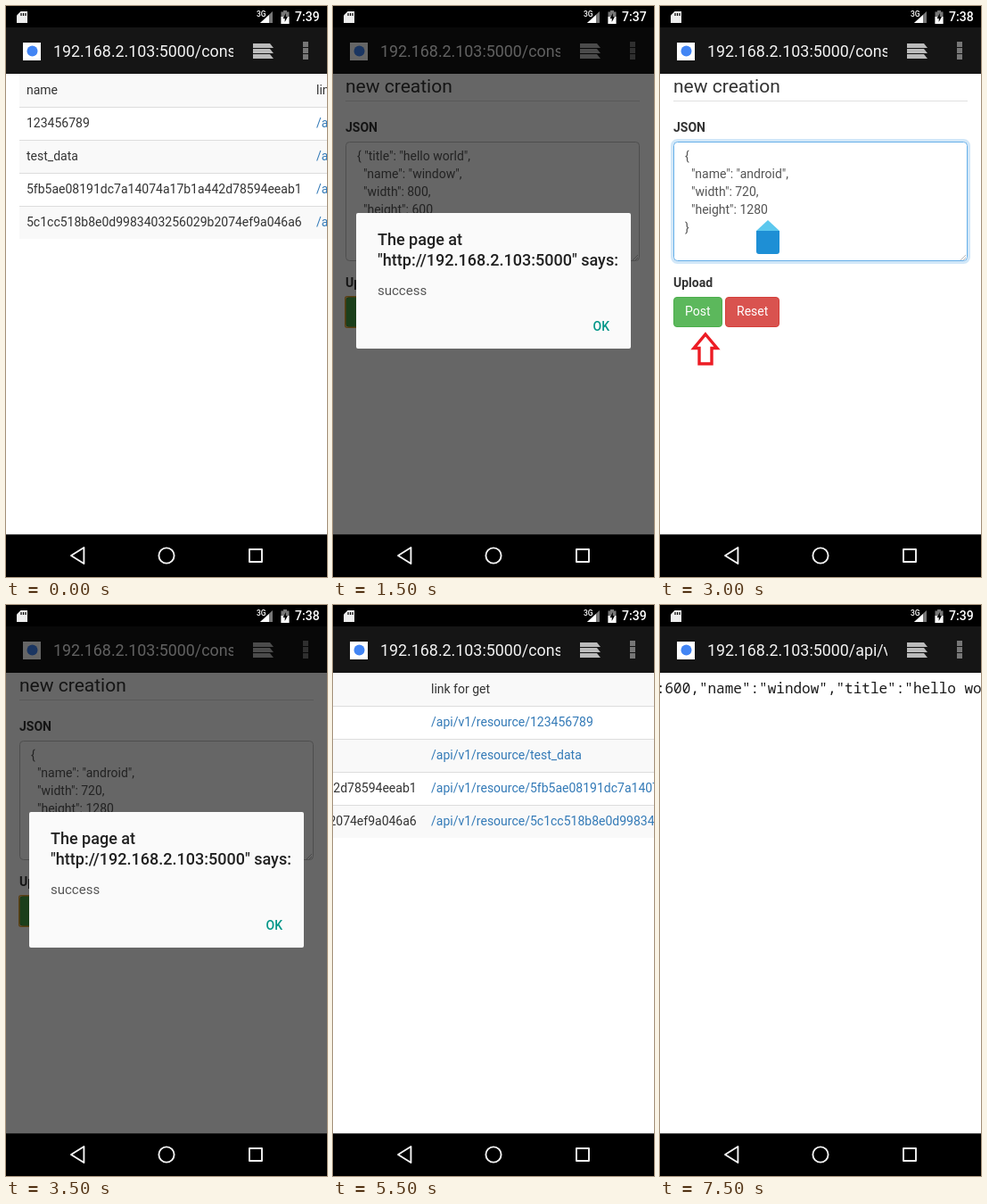
Write an HTML page that moves like this. It is 360 by 640 pixels and loops after 8000 ms.

```html
<!DOCTYPE html>
<html lang="en">
<head>
<meta charset="utf-8">
<title>REST console on a phone</title>
<style>
  html, body { margin: 0; width: 100%; height: 100%; overflow: hidden; background: #000; }
  svg { display: block; width: 360px; height: 640px; }
  text { font-family: Roboto, "Noto Sans", sans-serif; white-space: pre; }
</style>
</head>
<body>
<svg viewBox="0 0 360 640">
  <defs><clipPath id="urlClip"><rect x="50" y="24" width="205" height="52"/></clipPath></defs>
  <rect width="360" height="640" fill="#fff"/>
  <g id="page"></g>
  <g id="bars"></g>
  <g id="overlay"></g>
  <g id="system"></g>
</svg>
<script>
const STEP = 500;
const INK = '#333', LINK = '#337ab7', RED = '#ed1c24';
const HOST = '192.168.2.103:5000';
const HASHES = [
  '5fb5ae08191dc7a14074a17b1a442d78594eeab1',
  '5c1cc518b8e0d9983403256029b2074ef9a046a6'
];
const POST_BODY = ['{ "title": "hello world",', '  "name": "window",', '  "width": 800,', '  "height": 600', '}'];
const PUT_BODY = ['{', '  "name": "android",', '  "width": 720,', '  "height": 1280', '}'];
const RESULT = '{"height":600,"name":"window","title":"hello world","width":800}';

const escape = s => s.replace(/&/g, '&amp;').replace(/</g, '&lt;');
const text = (x, y, s, size = 14, fill = INK, extra = '') =>
  `<text x="${x}" y="${y}" font-size="${size}" fill="${fill}" ${extra}>${escape(s)}</text>`;
const rect = (x, y, w, h, fill, extra = '') =>
  `<rect x="${x}" y="${y}" width="${w}" height="${h}" fill="${fill}" ${extra}/>`;
const path = (d, fill, extra = '') => `<path d="${d}" fill="${fill}" ${extra}/>`;
const bold = 'font-weight="700"', medium = 'font-weight="500"', middle = 'text-anchor="middle"';

// Outlined arrow pointing up, with its tip at (x, y).
function arrow(x, y, head, stem, neck, length, turn = 0) {
  const d = `M0 0L${head} ${neck}H${stem}V${length}H${-stem}V${neck}H${-head}Z`;
  return path(d, '#fff', `stroke="${RED}" stroke-width="3.4" transform="translate(${x} ${y}) rotate(${turn})"`);
}

function home(x, arrowX, arrowY) {
  const heading = (y, s) => text(x, y, s, 24);
  const link = (y, s) =>
    `<text x="${x}" y="${y}" font-size="14" fill="${INK}"><tspan fill="${LINK}">${s}</tspan> ...</text>`;
  const verbs = ['GET', 'PUT', 'POST', 'DELETE'];
  return heading(125, 'Help') + verbs.map((v, i) => link(154 + i * 30, 'usage for ' + v)).join('')
    + heading(291, 'Operation Console') + verbs.map((v, i) => link(320 + i * 30, 'op console for ' + v)).join('')
    + heading(457, 'Log')
    + ['timestamp of request...', 'received data...', 'visualization of structure content...']
      .map((s, i) => text(x, 486 + i * 30, '(v) ' + s)).join('')
    + text(x, 576, 'click here to download', 14, LINK)
    + arrow(arrowX, arrowY, 15.5, 8, 22, 46, -90);
}

function button(x, w, label, fill, border) {
  return rect(x + .5, 326.5, w - 1, 33, fill, `rx="3.5" stroke="${border}"`) + text(x + 13, 347, label, 14, '#fff');
}

function form(x, lines, { editing = false, pressed = false, pointer = '' } = {}) {
  const glow = editing
    ? rect(x - 1.5, 150.5, 333, 137, 'none', 'rx="6" stroke="#66afe9" stroke-width="3" stroke-opacity=".3"') : '';
  const grip = path(`M${x + 328} 279l-6 6M${x + 328} 282l-3 3`, 'none', 'stroke="#aaa" stroke-width=".8"');
  const handle = editing
    ? path('M121 240L134 252H108Z', '#5cc8ee') + path('M108 252H134V275Q134 278 131 278H111Q108 278 108 275Z', '#1e8fd5') : '';
  return text(x, 97, 'new creation', 21)
    + rect(x, 106, 330, 1, '#e0e0e0')
    + text(x, 141, 'JSON', 14, INK, bold)
    + glow + rect(x + .5, 152.5, 329, 133, '#fff', `rx="4" stroke="${editing ? '#66afe9' : '#c4c4c4'}"`) + grip
    + lines.map((s, i) => text(x + 13, 173 + i * 20, s, 14, '#555')).join('') + handle
    + text(x, 315, 'Upload', 14, INK, bold)
    + button(x, 55, 'Post', pressed ? '#449d44' : '#5cb85c', pressed ? '#398439' : '#4cae4c')
    + (pressed ? rect(x - .2, 325.8, 55.4, 34.4, 'none', 'rx="2" stroke="#e2a233" stroke-width="1.6"') : '')
    + button(x + 58, 61, 'Reset', '#d9534f', '#d43f3a')
    + pointer;
}

function table(scroll) {
  const rows = ['123456789', 'test_data', ...HASHES];
  let out = '';
  for (let i = 0; i < 5; i++) {
    const y = 76 + i * 37;
    if (i % 2 === 0) out += rect(15, y, 775, 37, '#f9f9f9');
    if (i) out += rect(15, y, 775, 1, '#ddd');
    out += text(23, y + 23, i ? rows[i - 1] : 'name');
    out += i ? text(348, y + 23, '/api/v1/resource/' + rows[i - 1], 14, LINK) : text(348, y + 23, 'link for get');
  }
  return `<g transform="translate(${-scroll})">${out}</g>`;
}

const result = scroll =>
  text(8 - scroll, 99, RESULT, 16, '#1a1a1a', `style="font-family:'Noto Sans Mono','DejaVu Sans Mono',monospace"`);

function dialog() {
  return rect(0, 24, 360, 569, '#000', 'fill-opacity=".6"')
    + rect(26, 232, 308, 152, '#fafafa', 'rx="2"')
    + text(50, 268, 'The page at', 18, '#212121', medium)
    + text(50, 291, `"http://${HOST}" says:`, 18, '#212121', medium)
    + text(50, 324, 'success', 15, '#555')
    + text(310, 364, 'OK', 14, '#009688', medium + ' text-anchor="end"');
}

function keyboard() {
  let out = rect(0, 352, 360, 241, '#263238') + rect(0, 352, 360, 40, '#21292e');
  ['qwertyuiop', 'asdfghjkl', 'zxcvbnm'].forEach((keys, row) => {
    const start = 180 - keys.length * 18 + 18;
    [...keys].forEach((key, i) => {
      out += text(start + i * 36, 424 + row * 50, key, 22, '#eceff1', middle);
    });
  });
  return out
    + path('M27 508L36 518H31V525H23V518H18Z', '#b0bec5')
    + path('M322 517L330 509H347V525H330Z', '#b0bec5')
    + text(27, 573, '?123', 14, '#b0bec5', middle)
    + text(72, 572, ',', 20, '#eceff1', middle)
    + rect(94, 556, 172, 22, '#37474f', 'rx="2"')
    + text(288, 572, '.', 20, '#eceff1', middle)
    + '<circle cx="333" cy="567" r="18" fill="#4db6ac"/>'
    + path('M340 561V568H326M330 564L326 568L330 572', 'none', 'stroke="#fff" stroke-width="2"');
}

function toolbar(url) {
  const sheet = y => path(`M277 ${y}H296L300 ${y + 5}H277Z`, '#bbb');
  return rect(0, 24, 360, 52, '#151515')
    + rect(19, 41, 20, 20, '#fff') + '<circle cx="29.5" cy="50.5" r="6" fill="#4285f4"/>'
    + `<g clip-path="url(#urlClip)">${text(53, 57, url, 17.85, '#f2f2f2')}</g>`
    + [42, 48, 54].map(sheet).join('')
    + [40, 47, 54].map(y => rect(333, y, 6, 6, '#777')).join('');
}

function system(clock, typing) {
  const line = 'stroke="#f4f4f4" stroke-width="1.9" stroke-linejoin="round"';
  return rect(0, 0, 360, 24, '#000') + rect(0, 592.3, 360, 47.7, '#000')
    + path('M16.5 6H24V19H12V10.5Z', '#eee')
    + path('M17 8V11M19.5 8V11M22 8V11', 'none', 'stroke="#000" stroke-width="1.2"')
    + path('M299 6V19H285Z', '#777') + path('M295 10V19H285Z', '#fff')
    + text(281, 12, '3G', 8.5, '#fff', medium)
    + path('M311 5H315V6.5H317.5V20H308.5V6.5H311Z', '#777') + path('M308.5 12H317.5V20H308.5Z', '#fff')
    + path('M314 8L310.5 14H312.7V18L316 12H313.8Z', '#000')
    + text(324, 17, clock, 14, '#fff', medium)
    + path(typing ? 'M70.5 610H89.5L80 625Z' : 'M73 616L87.4 607V625Z', 'none', line)
    + `<circle cx="180" cy="616" r="8.6" fill="none" ${line}/>`
    + rect(273, 609, 14, 14, 'none', line);
}

const CONSOLE = HOST + '/console', API = HOST + '/api/v1/resource';
const postPointer = arrow(45, 369, 16, 8, 18, 39);
const putPointer = arrow(51, 368, 13, 7, 15.5, 33);
const scene = (clock, url, page, overlay = '', typing = false) => ({ clock, url, page, overlay, typing });

const scenes = [
  scene('7:39', CONSOLE, table(0)),
  scene('7:37', HOST, home(14, 177, 378)),
  scene('7:37', CONSOLE, form(14, POST_BODY, { pointer: postPointer })),
  scene('7:37', CONSOLE, form(14, POST_BODY, { pressed: true }), dialog()),
  scene('7:37', CONSOLE, form(14, POST_BODY, { pressed: true })),
  scene('7:38', CONSOLE, form(15, PUT_BODY, { editing: true }), keyboard(), true),
  scene('7:38', CONSOLE, form(15, PUT_BODY, { editing: true, pointer: putPointer })),
  scene('7:38', CONSOLE, form(15, PUT_BODY, { pressed: true }), dialog()),
  scene('7:38', CONSOLE, form(15, PUT_BODY, { pressed: true })),
  scene('7:38', HOST, home(15, 168, 317.5)),
  scene('7:39', CONSOLE, table(0)),
  scene('7:39', CONSOLE, table(238)),
  scene('7:39', CONSOLE, table(415)),
  scene('7:39', API, result(0)),
  scene('7:39', API, result(45)),
  scene('7:39', API, result(98.5))
];

const layer = id => document.getElementById(id);
let shown = -1;

function draw(time) {
  const index = Math.floor(time / STEP) % scenes.length;
  if (index === shown) return;
  shown = index;
  const s = scenes[index];
  layer('page').innerHTML = s.page;
  layer('bars').innerHTML = toolbar(s.url);
  layer('overlay').innerHTML = s.overlay;
  layer('system').innerHTML = system(s.clock, s.typing);
}

const start = performance.now();
function tick() {
  draw(performance.now() - start);
  requestAnimationFrame(tick);
}
tick();
</script>
</body>
</html>
```
